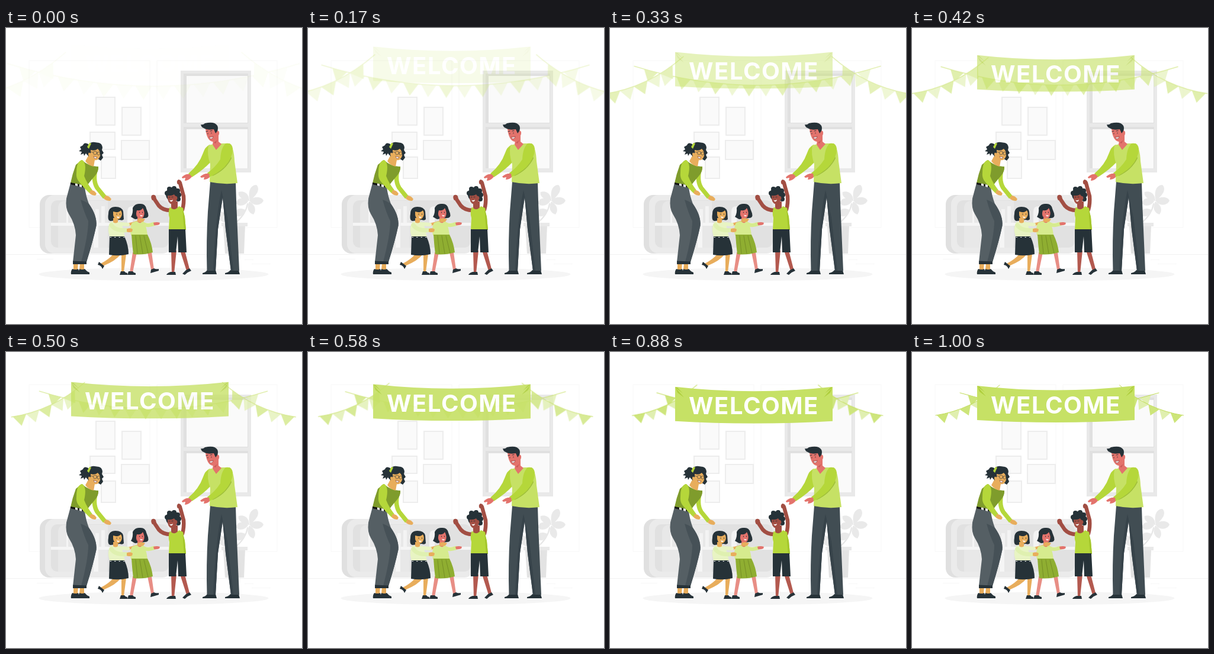
An HTML page that plays this animation: 500x500 px, repeating every 1040 ms.

```html
<!DOCTYPE html>
<html lang="en">
<head>
<meta charset="utf-8">
<title>Welcome</title>
<style>
html, body { margin: 0; width: 100%; height: 100%; overflow: hidden; background: #fff; }
svg { display: block; width: 100vw; height: 100vh; --t: .04; }
.garland, .banner {
  animation: zoom-out 1s ease-out both paused;
  animation-delay: calc(var(--t) * -1s);
}
.garland { transform-origin: 249px 88px; }
.banner { animation-name: slide-down; animation-timing-function: cubic-bezier(.36, -.01, .5, 1.38); }
@keyframes zoom-out { from { opacity: 0; transform: scale(1.5); } to { opacity: 1; transform: none; } }
@keyframes slide-down { from { opacity: 0; transform: translateY(-30px); } to { opacity: 1; transform: none; } }
.banner text { font: 700 40px Inter, "Open Sans", sans-serif; letter-spacing: 1.5px; text-anchor: middle; fill: #fff; }
.line { fill: none; stroke-linecap: round; stroke-linejoin: round; }
.dark { fill: #263238; }
.lime { fill: #b5d73a; }
.light { fill: #c6e165; }
.tan { fill: #e8ad5c; }
.pink { fill: #e3736c; }
.blush { fill: #e88e85; }
.brown { fill: #a24e43; }
</style>
</head>
<body>
<svg id="stage" viewBox="0 0 500 500">
  <g id="room">
    <g fill="none" stroke="#f7f7f7">
      <path d="M39 337V55H243V337ZM255 337V55H458V337Z"/>
      <path d="M0 382.5H500" stroke="#f1f1f1"/>
      <path d="M415 398.5H447M52 390.5H80M403 391.5H418"/>
    </g>
    <path d="M152 117h32v47h-32zM196 134h32v47h-32zM142 176h42v29h-42zM195 190h47v32h-47zM161 218h24v36h-24z" fill="#fafafa" stroke="#ededed" stroke-width="2"/>
    <path d="M295 72H414V244H295Z" fill="#e9e9e9"/>
    <path d="M300 77H409V161H300ZM300 167H409V237H300Z" fill="#e0e0e0"/>
    <path d="M305 81H408V160H305ZM305 171H408V237H305Z" fill="#fafafa"/>
    <rect x="57" y="282" width="210" height="99" rx="16" fill="#e0e0e0"/>
    <rect x="66" y="282" width="214" height="99" rx="16" fill="#ebebeb"/>
    <rect x="76" y="291" width="199" height="80" rx="11" fill="#e1e1e1"/>
    <path d="M88 329V305q0-13 13-13H172V329ZM88 371V334H172V371Z" fill="#e8e8e8"/>
    <path d="M76 329H275V334H76ZM102 292h3v37h-3zM148 334h8v37h-8z" fill="#f5f5f5"/>
    <path d="M151 306h6v23h-6zM161 301h6v28h-6zM205 310q0-9 9-9v28h-9z" fill="#f3f3f3"/>
    <g fill="#e9e9e9">
      <path d="M388 329Q405 315 408 297" class="line" stroke="#e6e6e6" stroke-width="2"/>
      <path d="M412 291C408 277 413 265 423 265C430 272 424 283 412 291ZM411 292C399 291 391 284 393 277C403 274 411 281 411 292ZM411 291C420 283 433 285 435 292C429 302 416 300 411 291ZM411 293C422 299 423 309 418 315C408 312 406 302 411 293ZM409 293C404 300 394 303 388 296C390 287 402 284 409 293ZM404 307C393 302 386 307 388 317C397 321 403 315 404 307ZM371 329C359 326 355 318 363 310C372 312 376 320 371 329Z"/>
    </g>
    <path d="M367 333H404L402 381H370Z" fill="#e3e3e3"/>
    <path d="M364 329H408V335H364Z" fill="#e9e9e9"/>
    <ellipse cx="249.500" cy="416" rx="194" ry="11" fill="#f5f5f5"/>
  </g>

  <g id="woman">
    <path class="tan" d="M114 395h8l-1 14h-7zM125 396h7v12h-8z"/>
    <path class="dark" d="M112 407q6 2 10 0l3 9H110q-1-5 2-9ZM124 407q5 2 9 0q3 4 8 6v3H122q0-5 2-9Z"/>
    <path d="M109 262L133 269Q135 284 140 297Q154 317 152.500 334Q147 360 136 395H113L118 350Q117 331 106 314Q100 304 102 288Z" fill="#555f64"/>
    <path d="M126 290Q132 312 139 326Q139 350 127 395H136Q147 360 152.500 334Q154 317 140 297Q132 292 126 290Z" fill="#465157"/>
    <path class="dark" d="M113 393.500L136 394.500V399H113Z"/>
    <path d="M152 236Q146 257 154 270L167 286" class="line" stroke="#b5d73a" stroke-width="7.500" style="stroke-linecap:butt"/>
    <path class="tan" d="M168 283Q174 283 178 289L176 292Q169 292 165 288Z"/>
    <path d="M128 223Q142 235 156 234Q157 242 150 250Q141 260 135 269L109 262Q112 247 118 231Z" fill="#7f9c2c"/>
    <path class="tan" d="M140 214L150 223L148 234Q139 232 134 225Z"/>
    <path d="M109 261L134 266V270L109 264Z" fill="#111"/>
    <path d="M117 262.500l4 1v3.500l-4-1zM124 264l4 1v4l-4-1z" fill="#fff"/>
    <path class="lime" d="M129 223Q119 224 119 244Q118 252 122 258Q130 269 141 279L146 274Q136 261 132 250Q137 229 129 223Z"/>
    <path class="tan" d="M143 274Q149 273 153 280L151 283Q145 283 141 279Z"/>
    <path class="dark" d="M137 201Q142 191 150 193L157 194Q162 195 163 202L162 206L165 211L162 214L164 219L160 224L155 221L151 214L144 209L140 217L135 212Z"/>
    <path class="dark" d="M139 196Q132 192 130 198L125 201L127 205L123 208L128 209L126 214L131 212L132 216L136 210L140 213Z"/>
    <path class="lime" d="M137 201L141 194L144 195L140 204Z"/>
    <path class="tan" d="M143 206Q151 208 155 204Q160 209 159 216Q156 225 149 223Q141 222 139 214Q139 208 143 212Z"/>
    <g class="line" stroke="#263238" stroke-width=".6">
      <circle cx="150.500" cy="211" r="3"/><circle cx="156.500" cy="212" r="2.600"/>
      <path d="M147 210L141 209"/>
    </g>
    <path d="M148 216.500Q151 218.500 154 218Q152 222 149 219.500Z" fill="#fff" stroke="#7a3a2c" stroke-width=".6"/>
  </g>

  <g id="girls">
    <path class="tan" d="M181 382H194Q186 393 164 402L160 398Q175 390 181 382ZM195 382H203L199 412H195Z"/>
    <path class="dark" d="M157 395L166 402L163 407Q161 401 155 400ZM194 411h6q2 3 5 3v3H192Z"/>
    <path d="M203 332Q216 331 228 325" class="line" stroke="#e8ad5c" stroke-width="4.500"/>
    <path class="blush" d="M214 379H221L214 413H209ZM239 379H246L250 408H245Z"/>
    <path class="dark" d="M207 411h7q2 3 5 3v3H205ZM245 408l5-2q3 2 8 1v3l-14 4Z"/>
    <path class="dark" d="M214 304Q218 296 226 297Q235 296 237 305L240 313Q242 321 235 321L218 323L211 319Q215 313 214 304Z"/>
    <path d="M213 329Q222 324 232 327Q237 332 239 350H211Q208 337 213 329Z" fill="#d6eb8e"/>
    <path d="M228 328Q236 336 250 331" class="line" stroke="#d6eb8e" stroke-width="6.500"/>
    <path class="pink" d="M249 329Q255 327 260 329L259 332Q254 334 250 333ZM222 320H229V328Q226 331 222 327Z"/>
    <path class="pink" d="M221 308Q229 309 231 304Q235 311 233 317Q231 323 225 321Q219 319 220 312Z"/>
    <path d="M226 315.500Q229 317 231 316Q230 319 227.500 318Z" fill="#fff"/>
    <path d="M225.500 311v1M230.500 311v1" class="line" stroke="#263238"/>
    <path d="M212 349H239Q246 363 248 379Q231 384 215 382Q213 365 212 349Z" fill="#8fae31"/>
    <path d="M219 351L222 381M226 351L231 381M233 351L240 380" class="line" stroke="#768f26"/>
    <path class="tan" d="M223 322Q230 320 235 323L232 327Q226 329 222 327Z"/>
    <path class="dark" d="M173 314Q173 302 185 302Q196 302 198 310L199 323Q197 326 192 324L177 326Q171 326 173 314Z"/>
    <path d="M176 328Q185 325 195 329L201 352H175Q170 338 176 328Z" fill="#e8f4c3"/>
    <path d="M194 331L206 332" class="line" stroke="#e8f4c3" stroke-width="6"/>
    <path d="M178 333Q184 343 204 341.500" class="line" stroke="#dff0b0" stroke-width="7"/>
    <path class="tan" d="M204 339.500Q210 337 214 340L213 344Q208 346 204 344ZM181 321H189V328Q185 331 181 328Z"/>
    <path class="tan" d="M181 310Q190 313 194 308Q197 313 195 318Q192 325 186 323Q181 320 181 315Z"/>
    <path d="M187 318Q190 319.500 192 318.500Q191 322 188 320.500Z" fill="#fff"/>
    <path d="M187 314v1M192.500 314v1" class="line" stroke="#263238"/>
    <path class="dark" d="M175 352H200Q207 367 207 382Q191 386 174 383Z"/>
    <path d="M176 353.500H201" class="line" stroke="#fff" stroke-width="1" stroke-dasharray="1.500 6"/>
  </g>

  <g id="boy">
    <path d="M279 376H288L284 414H280ZM294 376H302L310 407L305 410Z" fill="#b3594f"/>
    <path class="dark" d="M278 412h8l1 5H271q1-3 7-5ZM304 409l6-3 3 4q-6 2-11 7l-4-2Z"/>
    <path d="M278 308Q265 308 258 300L250 288M298 307Q301 296 300 284L294 262" class="line" stroke="#a24e43" stroke-width="6.500"/>
    <path class="brown" d="M247 291Q244 286 246 283Q250 280 253 284L254 289ZM290 264Q287 259 291 256Q296 256 297 262ZM279 293H290V306Q284 311 279 305Z"/>
    <path class="lime" d="M277 302Q284 311 292 301L299 304Q300 313 302 319L304 341H275L276 321Q273 311 277 302Z"/>
    <path d="M299 304Q300 313 302 319L304 341H301Q298 316 299 304Z" fill="#a5c72d"/>
    <g class="dark">
      <circle cx="282" cy="281" r="12"/><circle cx="272" cy="279" r="4"/><circle cx="276" cy="272" r="4"/>
      <circle cx="284" cy="271" r="4"/><circle cx="290" cy="275" r="4"/><circle cx="292" cy="282" r="4"/>
      <circle cx="291" cy="289" r="4"/>
    </g>
    <path class="brown" d="M273 283Q280 284 284 281Q286 285 288 284Q291 287 288 291Q286 299 280 298Q272 295 273 283Z"/>
    <path d="M276 290.500Q279 292 282 290Q281 294 278 293Z" fill="#fff"/>
    <path d="M275 286l2-.4M280 285.500l2 0" class="line" stroke="#263238" stroke-width=".8"/>
    <path class="dark" d="M275 340H303L305 379H291L290 352L287 379H275Z"/>
  </g>

  <g id="man">
    <path class="dark" d="M340 409h14l2 7H332v-2q5-1 8-5ZM379 409h14l2 7H370v-2q6-1 9-5Z"/>
    <path d="M345 260L388 261Q389 300 391 340L394 410H380L371 340L366 286L358 340L354 410H339.500Q338 360 341 310Z" fill="#414d53"/>
    <path d="M364 274Q354 320 350 410H354L358 340L366 286L371 340L380 410H384L374 320Z" fill="#37434a"/>
    <path class="lime" d="M344 197Q336 201 333 211Q326 231 308 246L314 252Q334 239 345 227Z"/>
    <path class="pink" d="M310 247Q303 246 297 252L298 254L303 253L302 258Q309 258 314 251Z"/>
    <path class="light" d="M342 198L351 196L366 195L378 195Q385 202 386 225L391 262Q367 265 344 260L345 230Q339 213 342 198Z"/>
    <path d="M381 220Q371 240 349 250L347 246L376 205Z" fill="#8fb02b" opacity=".75"/>
    <path class="lime" d="M371 195Q382 193 383 204Q383 220 369 235Q357 246 343 252L340 245Q353 236 362 222Q363 202 371 195Z"/>
    <path class="pink" d="M343 246Q335 245 328 251L330 253L335 252L334 256Q340 256 344 252Z"/>
    <path class="pink" d="M350 189L359 181V192L364 196L355 206L349 197Z"/>
    <path d="M351 194l6-5-3 6z" fill="#c95a58"/>
    <path class="pink" d="M337 170Q345 171 352 168Q354 175 356 173Q361 173 360 179Q359 183 356 184Q356 192 349 192Q339 190 337 170Z"/>
    <path class="dark" d="M329 163Q333 164 336 161Q352 157 357 165Q359 169 357 174L354 178L351 171Q340 173 334 169Q330 168 329 163Z"/>
    <path d="M343 184Q347 185.500 350 183Q349 188 345 187Z" fill="#fff" stroke="#7a3033" stroke-width=".6"/>
    <path d="M341 178v1M347 177v1M338 175l3-1M345 174l3-.6" class="line" stroke="#263238" stroke-width=".9"/>
  </g>

  <g class="garland" id="garland"></g>

  <g class="banner">
    <path class="light" d="M110 57Q243 72 376 57V115Q243 123 110 115Z"/>
    <path d="M111 59L125 75L114 67ZM114 58.500L123 68L110 58ZM375 59L361 75L372 67ZM372 58.500L363 68L376 58Z" fill="#aece3c"/>
    <text x="243" y="103.500">WELCOME</text>
  </g>
</svg>
<script>
const stage = document.getElementById('stage');
const mix = (a, b, c, t) => (1 - t) ** 2 * a + 2 * t * (1 - t) * b + t * t * c;

// A quadratic string carrying pennants centred at the given positions along it.
function string([x0, y0, x1, y1, x2, y2], spots, half, drop) {
  const flags = spots.map((t, i) => {
    const x = mix(x0, x1, x2, t), y = mix(y0, y1, y2, t);
    const dx = (1 - t) * (x1 - x0) + t * (x2 - x1);
    const dy = (1 - t) * (y1 - y0) + t * (y2 - y1);
    const len = Math.hypot(dx, dy), u = dx / len, v = dy / len;
    const points = [
      [x - u * half, y - v * half],
      [x + u * half, y + v * half],
      [x - v * drop, y + u * drop]
    ];
    return `<polygon points="${points.join(' ')}" fill="${i % 2 ? '#e0efaf' : '#cde57a'}"/>`;
  });
  return flags.join('') +
    `<path class="line" stroke="#c0dc55" d="M${x0} ${y0}Q${x1} ${y1} ${x2} ${y2}"/>`;
}

const middle = Array.from({ length: 14 }, (_, i) => .5 + (i - 6.5) * .0665);
const side = Array.from({ length: 5 }, (_, i) => .1 + i * .167);
const left = string([40, 107, 100, 98, 148, 56], side, 10, 15.5);
document.getElementById('garland').innerHTML =
  string([81, 69, 249, 121, 417, 69], middle, 9.5, 15.5) + left +
  `<g transform="translate(498.500 0) scale(-1 1)">${left}</g>`;

// The motion advances in 25 hard steps per loop.
const LOOP = 1040, STEPS = 25, STEP = 1000 / 24;
const start = performance.now();
function draw() {
  const time = (performance.now() - start) % LOOP;
  const step = Math.min(STEPS - 1, Math.floor((time + 3.4) / STEP));
  stage.style.setProperty('--t', (step + 1) / STEPS);
  requestAnimationFrame(draw);
}
draw();
</script>
</body>
</html>
```
